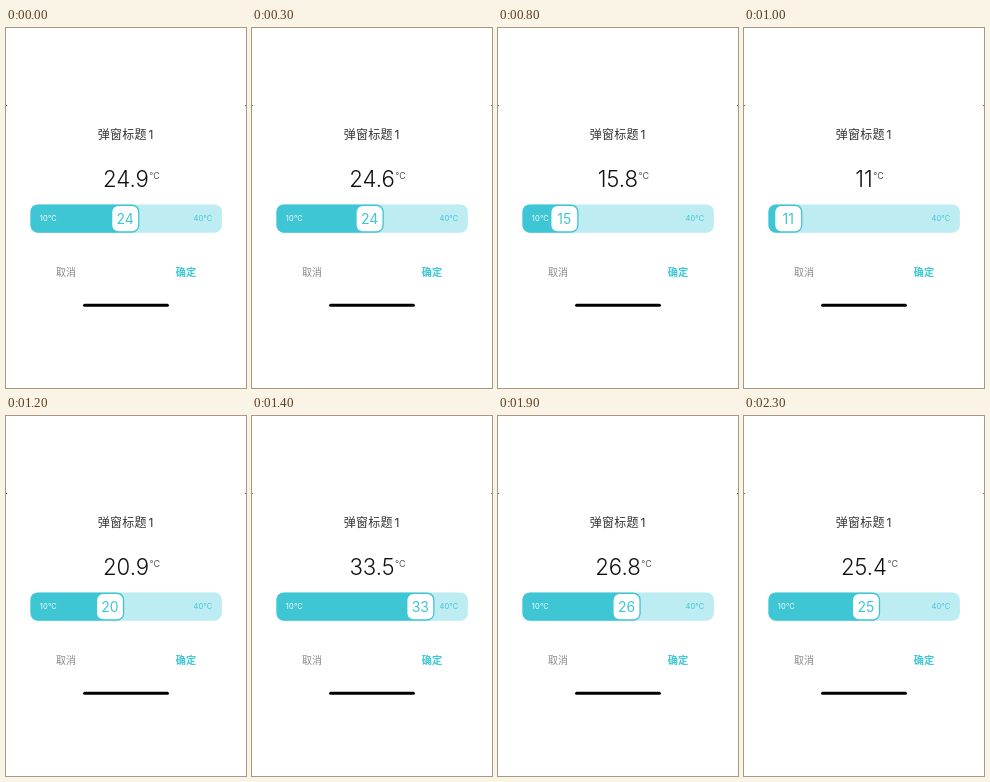
An HTML page with a canvas for the animation above (2400 ms loop, 240 by 360 pixels).

```html
<!DOCTYPE html>
<html lang="zh-CN">
<head>
<meta charset="utf-8">
<title>Temperature slider</title>
<style>
  html, body { margin: 0; width: 100%; height: 100%; overflow: hidden; background: #fff; }
  canvas { display: block; width: 240px; height: 360px; }
</style>
</head>
<body>
<canvas id="stage"></canvas>
<script>
const W = 240, H = 360, LOOP = 2400, TICK = 100;
const LEAD = 16; // the knob runs slightly ahead of the readout, in ms
const TEAL = '#3ec6d5', PALE = '#bdecf2';
const LATIN = 'Inter, Roboto, sans-serif';
const CJK = '"Noto Sans CJK SC", "Noto Sans CJK", sans-serif';
const track = { x: 24.4, y: 176.4, w: 191.5, h: 28.4, r: 7.5 };

// [time, temperature]
const keys = [
  [0, 24.9], [200, 24.6], [400, 24.6], [600, 22.2], [1000, 11],
  [1400, 33.5], [1600, 37.2], [1700, 34.7], [1900, 26.8], [2100, 25.4], [2400, 25.4]
];

const canvas = document.getElementById('stage');
const ctx = canvas.getContext('2d');
const ratio = window.devicePixelRatio || 1;
canvas.width = W * ratio;
canvas.height = H * ratio;
ctx.scale(ratio, ratio);

const slope = (a, b) => (b[1] - a[1]) / (b[0] - a[0]);

// Tangent at a key: flat at turning points, harmonic mean elsewhere.
function tangent(i) {
  if (i === 0 || i === keys.length - 1) return 0;
  const a = slope(keys[i - 1], keys[i]), b = slope(keys[i], keys[i + 1]);
  return a * b <= 0 ? 0 : 2 * a * b / (a + b);
}

function temperature(t) {
  let i = 0;
  while (i < keys.length - 2 && t >= keys[i + 1][0]) i++;
  const [t0, v0] = keys[i], [t1, v1] = keys[i + 1];
  const d = t1 - t0, u = (t - t0) / d, s = u * u * (3 - 2 * u);
  return v0 + (v1 - v0) * s
    + d * u * (1 - u) * ((1 - u) * tangent(i) - u * tangent(i + 1));
}

function box(x, y, w, h, r, color) {
  ctx.fillStyle = color;
  ctx.beginPath();
  ctx.roundRect(x, y, w, h, r);
  ctx.fill();
}

function text(str, x, y, font, color, align = 'center', spacing = 0) {
  ctx.font = font;
  ctx.letterSpacing = spacing + 'px';
  ctx.textAlign = align;
  ctx.fillStyle = color;
  ctx.fillText(str, x, y);
  return ctx.measureText(str).width;
}

function drawReadout(value) {
  const width = text(String(value), 120, 158.8, '350 22.2px ' + LATIN, '#111');
  text('°C', 120 + width / 2 + 0.4, 151, '400 9px ' + LATIN, '#555', 'left');
}

function drawSlider(level, value) {
  const { x, y, w, h, r } = track;
  const right = 52.5 + (level - 10) * 5.43;
  const small = '400 7.5px ' + LATIN;
  box(x, y, w, h, r, PALE);
  text('40°C', 206.3, 193.2, small, TEAL, 'right', 0.12);
  box(x, y, right - x, h, r, TEAL);
  text('10°C', 33.8, 193.2, small, '#fff', 'left', 0.15);
  box(right - 27.1, 178, 25.8, 25.2, 6, '#fff');
  text(String(Math.floor(value)), right - 14.2, 195.6, '400 14px ' + LATIN, TEAL);
}

function draw(t) {
  const value = Math.round(temperature(t) * 10) / 10;
  ctx.fillStyle = '#fff';
  ctx.fillRect(0, 0, W, H);
  ctx.fillStyle = '#666';
  ctx.fillRect(0, 77, 1, 1);
  ctx.fillRect(W - 1, 77, 1, 1);

  text('弹窗标题', 116.2, 110.9, '400 12px ' + CJK, '#333', 'center', 0.2);
  text('1', 145, 110.5, '400 12px ' + LATIN, '#333');
  drawReadout(value);
  drawSlider(temperature(Math.min(t + LEAD, LOOP)), value);
  text('取消', 60, 247.8, '400 10px ' + CJK, '#888');
  text('确定', 180, 247.8, '600 10.2px ' + CJK, TEAL);
  box(77.1, 275.7, 85.8, 3.1, 1.5, '#000');
}

function loop() {
  draw(Math.floor(performance.now() / TICK) * TICK % LOOP);
  requestAnimationFrame(loop);
}
loop();
</script>
</body>
</html>
```
